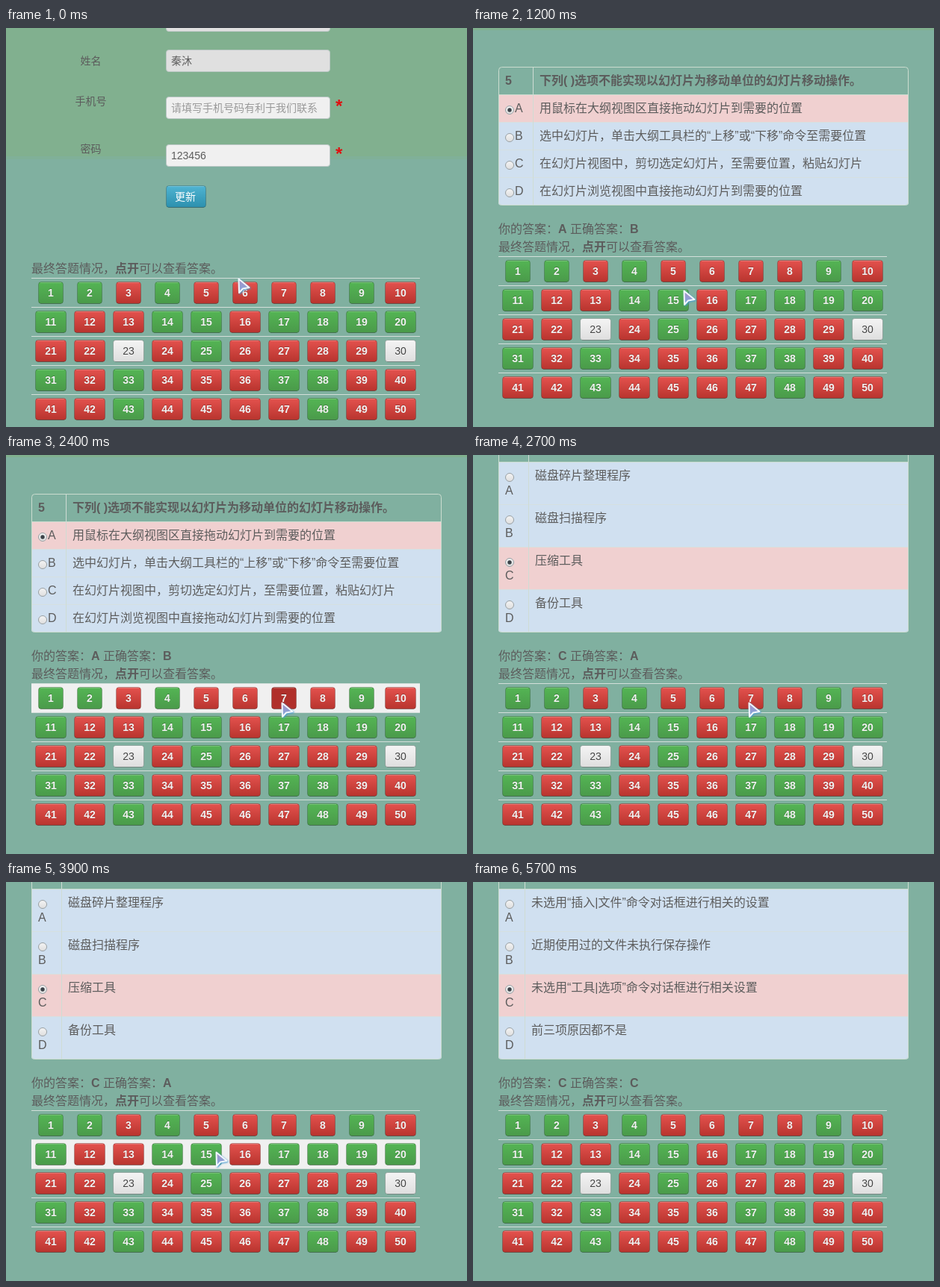
An HTML page that plays this animation: 617x535 px, repeating every 6000 ms.

```html
<!DOCTYPE html>
<html lang="zh-CN">
<head>
<meta charset="utf-8">
<title>答题情况</title>
<style>
html, body { margin: 0; width: 100%; height: 100%; overflow: hidden; background: #80b0a0; }
svg { display: block; width: 617px; height: 535px; }
text { font: 16px "Liberation Sans", "Noto Sans CJK SC", "Noto Sans CJK", sans-serif; fill: #5c5c5c; white-space: pre; }
.small { font-size: 14px; }
.b { font-weight: bold; }
.num { font-weight: bold; font-size: 14px; fill: #f2f2f2; text-anchor: middle; text-shadow: 0 -1px rgba(0,0,0,.25); }
.num.white { font-weight: normal; fill: #444; text-shadow: 0 1px rgba(255,255,255,.75); }
.star { font-size: 24px; font-weight: bold; fill: #e00f10; }
</style>
</head>
<body>
<svg viewBox="0 0 617 535">
  <defs id="defs"></defs>
  <g id="page"></g>
  <path id="cursor" d="M1.5 1.5L2 20L7 14.500L15.500 13Z" fill="url(#arrow)" stroke="#f3f8fc" stroke-width="2" stroke-linejoin="round" style="filter:drop-shadow(1px 1px 1px #4a9cd0)"/>
</svg>
<script>
const $ = id => document.getElementById(id);
const PINK = '#f0d0d0', BLUE = '#d0e0f0', LINE = '#cbdccf';

const gradient = (id, top, bottom) =>
  `<linearGradient id="${id}" x2="0" y2="1"><stop stop-color="${top}"/><stop offset="1" stop-color="${bottom}"/></linearGradient>`;
$('defs').innerHTML =
  gradient('red', '#e4524e', '#b8342e') +
  gradient('green', '#54b554', '#4a9a4a') +
  gradient('white', '#f4f4f4', '#dedede') +
  gradient('blue', '#50b4d2', '#2c90ae') +
  gradient('arrow', '#a892c4', '#7fa8e0');

const hotFill = { red: '#b0302b', green: '#4a954a', white: '#dedede' };
const greens = new Set([1, 2, 4, 9, 11, 14, 15, 17, 18, 19, 20, 25, 31, 33, 37, 38, 43, 48]);
const whites = new Set([23, 30]);

const rect = (x, y, w, h, fill, more = '') =>
  `<rect x="${x}" y="${y}" width="${w}" height="${h}" fill="${fill}" ${more}/>`;
const text = (x, y, s, cls = '', more = '') => `<text x="${x}" y="${y}" class="${cls}" ${more}>${s}</text>`;
const bold = s => `<tspan class="b">${s}</tspan>`;
const line = (x1, y1, x2, y2, color = LINE) => `<path d="M${x1} ${y1}L${x2} ${y2}" stroke="${color}"/>`;

function button(x, y, w, fill) {
  return rect(x + .5, y + .5, w - 1, 29, fill, 'rx="3.5" stroke="#000" stroke-opacity=".2"') +
    line(x + 3, y + 1.5, x + w - 3, y + 1.5, 'rgba(255,255,255,.2)') +
    line(x + 3, y + 29.5, x + w - 3, y + 29.5, 'rgba(0,0,0,.15)');
}

function grid(top, hoverRow, hot, pressed) {
  let out = '';
  for (let r = 0; r < 5; r++) {
    const y = top + 39 * r;
    if (r === hoverRow) out += rect(34, y + 1, 520, 38, '#f0f0f0');
    out += line(34, y + .5, 554, y + .5, '#d3dfda');
    for (let c = 0; c < 10; c++) {
      const n = r * 10 + c + 1, w = n < 10 ? 34 : 42, cx = 60 + 52 * c;
      const kind = whites.has(n) ? 'white' : greens.has(n) ? 'green' : 'red';
      const fill = n !== hot ? `url(#${kind})` : pressed ? '#972a26' : hotFill[kind];
      out += button(cx - w / 2, y + 5, w, fill) + text(cx, y + 25, n, 'num ' + kind);
    }
  }
  return out;
}

const summary = y => text(34, y, `最终答题情况，${bold('点开')}可以查看答案。`);

function form() {
  const input = (y, fill) => rect(214.5, y + .5, 219, 29, fill, 'rx="3.5" stroke="#bcc8c6"');
  return rect(0, 0, 617, 174, '#81b08f') + rect(0, 172, 617, 4, '#80b098') +
    input(-25, '#e0e0e0') + input(29, '#e0e0e0') + input(92, '#f0f0f0') + input(156, '#f0f0f0') +
    text(99.5, 49, '姓名', 'small') + text(221, 49, '秦沐', 'small') +
    text(92.5, 103, '手机号', 'small') +
    text(221, 112, '请填写手机号码有利于我们联系', 'small', 'style="fill:#999"') +
    text(99.5, 167, '密码', 'small') + text(221, 176, '123456', 'small') +
    text(441, 113, '*', 'star') + text(441, 177, '*', 'star') +
    button(214, 211, 54, 'url(#blue)') +
    text(226, 231, '更新', 'small', 'style="fill:#fff"') + summary(328);
}

function radio(y, on) {
  return `<circle cx="49" cy="${y}" r="5.5" fill="url(#white)" stroke="#98a0a4"/>` +
    (on ? `<circle cx="49" cy="${y}" r="2.700" fill="#3c4248"/>` : '');
}

// Tall rows put the letter below its radio button.
function quiz({ title, tall, split, options, picked, right }) {
  const top = tall ? 9.5 : 89.5, h = tall ? 57 : 37, textX = split + 8.5;
  let out = '<clipPath id="card"><rect x="34" y="-40" width="549" height="278" rx="4"/></clipPath><g clip-path="url(#card)">';
  options.forEach((s, i) => {
    const y = top + h * i, on = 'ABCD'[i] === picked;
    out += rect(34, y, 549, h, on ? PINK : BLUE) + line(34, y, 583, y, i ? '#d6e0e0' : LINE) +
      text(textX, y + 23.5, s) +
      radio(y + 20.5, on) + text(tall ? 43 : 56, y + (tall ? 43.5 : 23.5), 'ABCD'[i]);
  });
  const y0 = tall ? -40 : 52;
  out += `</g>${line(split, y0, split, 237, '#cfdcd4')}` +
    rect(34.5, y0 + .5, 548, 237 - y0, 'none', `rx="4" stroke="${LINE}"`);
  if (title) out += rect(0, 0, 617, 3, '#81b08f') + text(43, 76, '5', 'b') + text(textX, 76, title, 'b');
  return out + text(34, 275, `你的答案：${bold(picked)} 正确答案：${bold(right)}`) + summary(299);
}

const scenes = {
  form: form(),
  move: quiz({
    title: '下列( )选项不能实现以幻灯片为移动单位的幻灯片移动操作。',
    split: 80.5, picked: 'A', right: 'B',
    options: ['用鼠标在大纲视图区直接拖动幻灯片到需要的位置',
      '选中幻灯片，单击大纲工具栏的“上移”或“下移”命令至需要位置',
      '在幻灯片视图中，剪切选定幻灯片，至需要位置，粘贴幻灯片',
      '在幻灯片浏览视图中直接拖动幻灯片到需要的位置']
  }),
  disk: quiz({
    tall: true, split: 74.5, picked: 'C', right: 'A',
    options: ['磁盘碎片整理程序', '磁盘扫描程序', '压缩工具', '备份工具']
  }),
  recent: quiz({
    tall: true, split: 69.5, picked: 'C', right: 'C',
    options: ['未选用“插入|文件”命令对话框进行相关的设置', '近期使用过的文件未执行保存操作',
      '未选用“工具|选项”命令对话框进行相关设置', '前三项原因都不是']
  })
};

// start ms, scene, hovered row, hovered button, pointer x, y, pressed
const steps = [
  [0, 'form', -1, 0, 310, 335],
  [300, 'form', 0, 0, 284, 350],
  [600, 'form', 0, 5, 283, 350],
  [900, 'form', 0, 5, 281, 350, true],
  [1200, 'move', -1, 0, 281, 351],
  [1500, 'move', 1, 15, 281, 351],
  [1800, 'move', 1, 0, 326, 348],
  [2100, 'move', 0, 0, 369, 332],
  [2400, 'move', 0, 7, 368, 331],
  [2700, 'disk', -1, 0, 368, 331],
  [3300, 'disk', 0, 0, 368, 331],
  [3600, 'disk', 0, 0, 318, 337],
  [3900, 'disk', 1, 0, 280, 361],
  [4200, 'disk', 1, 15, 276, 363],
  [4500, 'recent', -1, 0, 276, 363],
  [5100, 'recent', 1, 15, 276, 363],
  [5400, 'recent', 2, 0, 272, 398],
  [5700, 'recent', -1, 0, -50, -50]
];

let shown;
function draw(now) {
  const t = now % 6000;
  const step = steps.findLast(s => s[0] <= t);
  if (step !== shown) {
    shown = step;
    const [, scene, row, hot, x, y, pressed] = step;
    $('page').innerHTML = scenes[scene] + grid(scene === 'form' ? 335 : 306, row, hot, pressed);
    $('cursor').setAttribute('transform', `translate(${x} ${y})`);
  }
  requestAnimationFrame(draw);
}
draw(performance.now());
</script>
</body>
</html>
```
